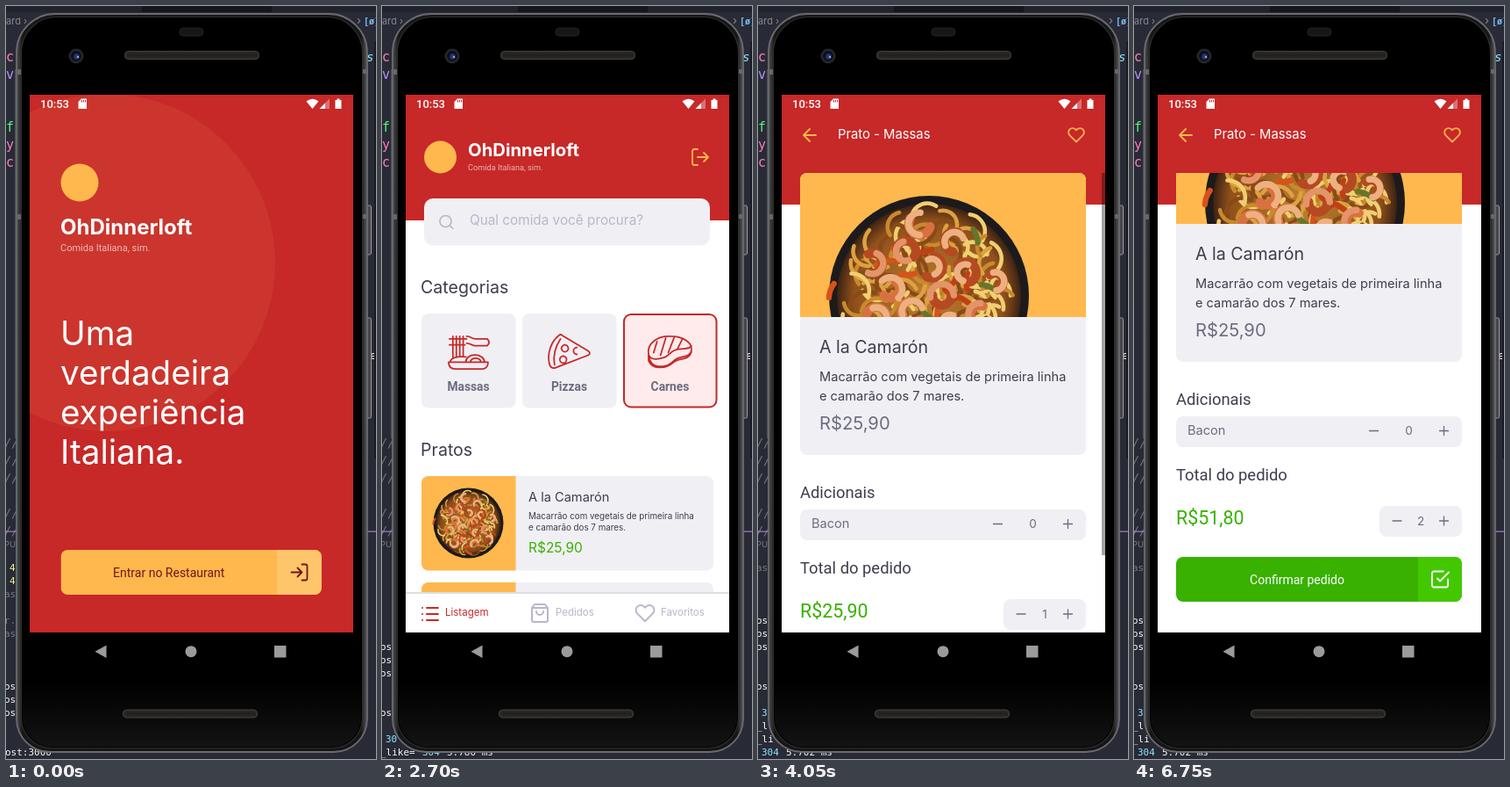
Recreate the animation shown at these times as an HTML page with a canvas. Size 422 by 857 pixels, loop 8000 ms.

```html
<!DOCTYPE html>
<html lang="pt-BR">
<head>
<meta charset="utf-8">
<title>Pedido no restaurante</title>
<style>
  html, body { margin: 0; width: 100%; height: 100%; overflow: hidden; background: #282a36; }
  canvas { display: block; }
</style>
</head>
<body>
<canvas id="stage" width="422" height="857"></canvas>
<script>
const ctx = document.getElementById('stage').getContext('2d');
const LOOP = 8000, STEP = 1350;
const BRAND = 'OhDinnerloft';
const RED = '#c72828', AMBER = '#ffb84d', PALE = '#f0eff4', INK = '#3d3d4d',
      GREY = '#6c6c80', MUTED = '#b7b7cc', GREEN = '#39b100', WHITE = '#fff';
const INTER = 'Inter, sans-serif', ROBOTO = 'Roboto, sans-serif', MONO = '"DejaVu Sans Mono", monospace';

const ICONS = {
  enter: 'M15 3h4a2 2 0 0 1 2 2v14a2 2 0 0 1-2 2h-4M10 17l5-5-5-5M15 12H3',
  leave: 'M9 21H5a2 2 0 0 1-2-2V5a2 2 0 0 1 2-2h4M16 17l5-5-5-5M21 12H9',
  search: 'M19 11a8 8 0 1 1-16 0a8 8 0 1 1 16 0M21 21l-4.35-4.35',
  list: 'M8 5h13M8 12h13M8 19h13M3 5h.1M3 12h.1M3 19h.1',
  bag: 'M6 2L3 6v14a2 2 0 0 0 2 2h14a2 2 0 0 0 2-2V6l-3-4zM3 6h18M16 10a4 4 0 0 1-8 0',
  heart: 'M20.84 4.61a5.5 5.5 0 0 0-7.78 0L12 5.67l-1.06-1.06a5.5 5.5 0 0 0-7.78 7.78L12 21.23l8.84-8.84a5.5 5.5 0 0 0 0-7.78z',
  back: 'M19 12H5M12 19l-7-7 7-7',
  check: 'M9 11l3 3L22 4M21 12v7a2 2 0 0 1-2 2H5a2 2 0 0 1-2-2V5a2 2 0 0 1 2-2h11',
  minus: 'M7 12h10',
  plus: 'M7 12h10M12 7v10',
  pasta: 'M8 4v24M12 4v24M16 4v24M20 4v24M4 7h20M4 14h18M24 4c5 0 6 3 10 3h14q4 4 0 8H34c-4 0-5-3-10-3M3 34h46c0 5-3 8-7 8H11c-5 0-8-3-8-8zM5 34c0-5 8-7 18-6M23 34c0-11 21-11 22 0M28 34c2-6 11-6 13 0',
  pizza: 'M15 3C6 10 1 24 4 36q1 5 6 5l39-15q4-2 0-5L19 3q-2-2-4 0zM17 7C11 16 8 26 10 37M22 14a4 4 0 1 0 .1 0M20 27a4 4 0 1 0 .1 0M36 17a4 4 0 1 0 .1 8',
  steak: 'M2 25C0 12 13 3 28 4c15 0 25 8 24 16c-1 10-14 6-20 12c-6 6-10 7-19 7C6 38 3 33 2 25zM2 25c2 7 10 6 17 4c8-2 8-9 18-10c8-1 13 0 15-4M2 26v6c4 11 20 10 28 3c7-7 19-2 22-13M12 10l-4 13M22 6l-6 20M32 5l-7 18M41 8l-5 10'
};

function text(str, x, y, size, color, font = INTER, style = '', align = 'left') {
  ctx.font = `${style} ${size}px ${font}`;
  ctx.fillStyle = color;
  ctx.textAlign = align;
  ctx.fillText(str, x, y);
}

function rect(x, y, w, h, color) {
  ctx.fillStyle = color;
  ctx.fillRect(x, y, w, h);
}

function box(x, y, w, h, r, fill, stroke, line = 1) {
  ctx.beginPath();
  ctx.roundRect(x, y, w, h, r);
  if (fill) { ctx.fillStyle = fill; ctx.fill(); }
  if (stroke) { ctx.strokeStyle = stroke; ctx.lineWidth = line; ctx.stroke(); }
}

function disc(x, y, r, color) {
  ctx.beginPath();
  ctx.arc(x, y, r, 0, Math.PI * 2);
  ctx.fillStyle = color;
  ctx.fill();
}

function shape(path, color) {
  ctx.fillStyle = color;
  ctx.fill(new Path2D(path));
}

function icon(name, x, y, color, scale = 1, line = 2) {
  ctx.save();
  ctx.translate(x, y);
  ctx.scale(scale, scale);
  ctx.strokeStyle = color;
  ctx.lineWidth = line;
  ctx.lineCap = ctx.lineJoin = 'round';
  ctx.stroke(new Path2D(ICONS[name]));
  ctx.restore();
}

function clipped(x, y, w, h, r, draw) {
  ctx.save();
  ctx.beginPath();
  ctx.roundRect(x, y, w, h, r);
  ctx.clip();
  draw();
  ctx.restore();
}

function seeded(seed) {
  return () => (seed = (seed * 16807) % 2147483647) / 2147483647;
}

// A bowl of noodles seen from above, with either prawns or strips on top.
function bowl(x, y, r, prawns) {
  const rand = seeded(prawns ? 9173421 : 3748113);
  const noodles = prawns ? ['#dca240', '#f0cf72', '#8a4a18', '#c88a2c'] : ['#c98522', '#dfa53c', '#7c4214', '#a9661c'];
  ctx.save();
  ctx.translate(x, y);
  ctx.scale(r, r);
  disc(0, 0, 1, '#1d1a1c');
  const glow = ctx.createRadialGradient(0, 0, 0.1, 0, 0, 0.92);
  glow.addColorStop(0, '#b87a2c');
  glow.addColorStop(0.8, '#8f501b');
  glow.addColorStop(1, '#3c2314');
  disc(0, 0, 0.92, glow);
  ctx.lineCap = 'round';

  // Arcs spread evenly over a disc of the given reach by the golden angle.
  const scatter = (count, reach, size, span, width, colors) => {
    for (let i = 0; i < count; i++) {
      const a = i * 2.4, d = reach * Math.sqrt((i + 0.5) / count), start = rand() * 6.28;
      ctx.beginPath();
      ctx.arc(Math.cos(a) * d, Math.sin(a) * d, size * (0.8 + rand() * 0.4), start, start + span);
      ctx.strokeStyle = colors[Math.floor(rand() * colors.length)];
      ctx.lineWidth = width;
      ctx.stroke();
    }
  };
  scatter(130, 0.78, 0.15, 2, 0.04, noodles);
  scatter(18, 0.76, 0.28, 0.6, 0.055, ['#c13f17', '#66762a', '#d8521c']);
  if (prawns) {
    scatter(17, 0.76, 0.1, 3.4, 0.09, ['#b54a22', '#d9703f']);
    scatter(17, 0.76, 0.1, 3.2, 0.065, ['#eeb080', '#e39468']);
  } else scatter(16, 0.68, 0.3, 0.6, 0.085, ['#e0a852', '#c65a20']);
  ctx.restore();
}

function logo(x, y, r, nameX, nameY, nameSize, tagY, tagSize) {
  disc(x, y, r, AMBER);
  text(BRAND, nameX, nameY, nameSize, WHITE, INTER, 'bold');
  text('Comida Italiana, sim.', nameX, tagY, tagSize, 'rgba(255,255,255,.65)', ROBOTO);
}

function button(x, y, w, split, fill, tail, label, color, glyph) {
  clipped(x, y, w, 51, 8, () => {
    rect(x, y, w, 51, fill);
    rect(split, y, x + w - split, 51, tail);
  });
  text(label, (x + split) / 2, y + 31, 14, color, ROBOTO, '', 'center');
  icon(glyph, (split + x + w) / 2 - 12, y + 13.5, color, 1, 1.8);
}

function welcome() {
  rect(27, 101, 369, 612, RED);
  disc(115, 292, 192, '#cb352d');
  logo(84, 201, 21.5, 62, 260, 24, 279, 11);
  ['Uma', 'verdadeira', 'experiência', 'Italiana.'].forEach((line, i) =>
    text(line, 62, 386 + i * 45, 38.6, WHITE));
  button(62.5, 619, 297.5, 309, AMBER, '#ffc56b', 'Entrar no Restaurant', '#6e1717', 'enter');
}

function listing(dish, meatChosen) {
  rect(27, 101, 369, 143, RED);
  logo(66.5, 172, 18.5, 98, 171, 20.3, 187, 9.2);
  icon('leave', 351, 160, AMBER, 1, 1.8);

  box(48, 219, 326, 53.5, 10, PALE);
  icon('search', 63.5, 236, MUTED, 0.82);
  text('Qual comida você procura?', 100, 249, 15.3, MUTED);

  text('Categorias', 44, 327, 19.6, INK);
  [['Massas', 'pasta', 73], ['Pizzas', 'pizza', 187], ['Carnes', 'steak', 302]].forEach(([label, glyph, x], i) => {
    const left = 45 + i * 115, active = meatChosen && i === 2;
    if (active) box(left + 1, 351, 105.5, 105.5, 8, '#ffebeb', RED, 2);
    else box(left, 350, 107.5, 107.5, 8, PALE);
    icon(glyph, x, 372, RED, 0.98, 1.8);
    text(label, left + 53.5, 438, 13.8, GREY, ROBOTO, 'bold', 'center');
  });

  text('Pratos', 44, 512, 19.6, INK);
  [535, 656].forEach(y => clipped(45, y, 333, 107.5, 8, () => {
    rect(45, y, 333, 108, PALE);
    rect(45, y, 107.5, 108, AMBER);
  }));
  bowl(98.5, 588.5, 40, dish.prawns);
  text(dish.name, 167, 564, 14.6, INK);
  dish.lines.forEach((line, i) => text(line, 167, 584 + i * 13, 9.8, INK));
  text(dish.price, 167, 622, 15.5, GREEN);

  rect(27, 667, 369, 2, '#dedee3');
  rect(27, 669, 369, 44, WHITE);
  icon('list', 43, 680, RED, 1, 1.9);
  text('Listagem', 72, 694, 11.5, RED);
  icon('bag', 168, 679, MUTED);
  text('Pedidos', 198, 694, 11.5, MUTED);
  icon('heart', 288, 679, MUTED);
  text('Favoritos', 318, 694, 11.5, MUTED);
}

function stepper(y, minusX, numberX, count) {
  icon('minus', minusX - 12, y - 12, GREY, 1, 1.3);
  text(count, numberX, y + 4.5, 13.5, GREY, INTER, '', 'center');
  icon('plus', 353.5 - 12, y - 12, GREY, 1, 1.3);
}

function detail(count, total, scroll, scrollbar) {
  rect(27, 101, 369, 125, RED);
  icon('back', 47, 135, AMBER, 1, 1.8);
  text('Prato - Massas', 91, 151, 14.8, WHITE);
  icon('heart', 352.8, 136.5, AMBER, 0.85, 2.1);

  clipped(27, 190, 369, 523, 0, () => {
    ctx.translate(0, -scroll);
    clipped(48, 190, 326, 321, 8, () => {
      rect(48, 190, 326, 321, PALE);
      clipped(48, 190, 326, 164, 0, () => {
        rect(48, 190, 326, 164, AMBER);
        bowl(195, 330, 114, true);
      });
    });
    text(camaron.name, 70, 395, 19.6, INK);
    camaron.lines.forEach((line, i) => text(line, 70, 427 + i * 22, 14.6, INK));
    text(camaron.price, 70, 482, 20.2, GREY);

    text('Adicionais', 48, 560, 18.4, INK, ROBOTO);
    box(48, 573, 326, 35, 8, PALE);
    text('Bacon', 61, 594, 14.6, GREY);
    stepper(589.5, 273.5, 313.5, '0');

    text('Total do pedido', 48, 646, 18.4, INK, ROBOTO);
    text(total, 48, 696, 21.4, GREEN, ROBOTO);
    box(280, 675, 94, 35, 8, PALE);
    stepper(692, 300, 327, count);
    button(48, 733, 326, 324, GREEN, '#43c800', 'Confirmar pedido', WHITE, 'check');
  });
  if (scrollbar) rect(392, 190, 4, 435, 'rgba(0,0,0,.36)');
}

const molho = {
  name: 'Ao molho', price: 'R$19,90', prawns: false,
  lines: ['Macarrão ao molho branco, fughi e cheiro', 'verde das montanhas.']
};
const camaron = {
  name: 'A la Camarón', price: 'R$25,90', prawns: true,
  lines: ['Macarrão com vegetais de primeira linha', 'e camarão dos 7 mares.']
};

const screens = [
  welcome,
  () => listing(molho, false),
  () => listing(camaron, true),
  () => detail('1', 'R$25,90', 0, true),
  () => detail('2', 'R$51,80', 0, false),
  () => detail('2', 'R$51,80', 106, false)
];

// Terminal rows peeking out beside the phone: [text, x, y, colour].
const LIGHT = '#f8f8f2', DIM = '#75777f', CYAN = '#8be9fd', YELLOW = '#f1fa8c', PINK = '#ff79c6';
const hosts = y => [0, 15, 30, 75].map(dy => ['os', -2, y + dy, LIGHT]);
const lastLogs = [['as', -2, 643, DIM], ...hosts(703), ['3', 4, 808, CYAN], ['_l', -2, 823, LIGHT],
  ['_li', -2, 838, LIGHT], ['304', 4, 853, CYAN], ['5.702 ms', 32, 853, LIGHT]];
const logs = [
  [['4', 4, 643, YELLOW], ['4', 4, 658, YELLOW], ['as', -2, 673, DIM], ['r.', -2, 703, DIM],
    ['as', -2, 718, DIM], ...hosts(778).slice(0, 3), ['ost:3000', -1, 853, LIGHT]],
  [['as', -2, 643, DIM], ['r.', -2, 673, DIM], ['as', -2, 688, DIM], ...hosts(748),
    ['304', 4, 853, CYAN], ['5.914 ms', 32, 853, LIGHT]],
  [...hosts(733), ['30', 4, 838, CYAN], ['_like=', -2, 853, LIGHT], ['304', 46, 853, CYAN], ['5.780 ms', 74, 853, LIGHT]],
  lastLogs, lastLogs, lastLogs
];

function editor(index) {
  rect(0, 0, 422, 857, '#282a36');
  rect(0, 0, 422, 7, '#21222c');
  rect(155, 0, 148, 7, '#15161d');
  text('ard ›', 0, 21, 11, '#85879a', INTER);
  text('›', 400, 21, 13, '#85879a', INTER);
  text('[ø]', 408, 21, 10, '#75bfff', MONO, 'bold');
  [['c', 63, PINK], ['v', 83, '#bd93f9'], ['f', 143, '#50fa7b'], ['y', 163, PINK], ['c', 183, PINK]]
    .forEach(([ch, y, color]) => text(ch, 0, y, 15, color, MONO));
  [502, 522, 542, 582, 602].forEach(y => text('//', -2, y, 14, '#70727c', MONO, 'italic'));
  text('se', 411, 63, 14, CYAN, MONO, 'italic');
  text('e', 415, 402, 13, LIGHT, MONO);
  rect(420, 40, 2, 475, '#191a21');
  rect(0, 597.5, 422, 1.2, '#a77fd8');
  text('PU', -2, 616, 9.5, DIM, INTER);
  logs[index].forEach(([str, x, y, color]) => text(str, x, y, 11, color, MONO));
}

function grille(x, y) {
  box(x, y, 153, 9, 4, '#292724', '#45423c');
  for (let i = 5; i < 150; i += 3) rect(x + i, y + 3, 1, 3, '#171615');
}

function phone() {
  [[227, 56], [355, 114]].forEach(([y, h]) => box(411, y, 5.5, h, 2, '#45454a', '#9a9a9c'));
  rect(10, 72, 2, 420, '#4a4b52');
  const rim = ctx.createLinearGradient(11, 0, 413, 0);
  [[0, '#55565a'], [0.012, '#303031'], [0.02, '#161616'], [0.98, '#161616'], [0.988, '#363637'], [1, '#606164']]
    .forEach(([at, color]) => rim.addColorStop(at, color));
  box(12, 9, 400, 840, [44, 44, 38, 38], rim, '#6a6b6e', 1.8);
  box(17.5, 12.5, 389, 832, [40, 40, 34, 34], '#000', '#2c2d2e', 1.2);
  [72, 237].forEach(y => {
    rect(11, y, 6, 6, '#66676a');
    rect(407, y, 6, 5, '#66676a');
  });

  const chin = ctx.createLinearGradient(0, 770, 0, 844);
  chin.addColorStop(0, 'rgba(35,35,35,0)');
  chin.addColorStop(1, 'rgba(35,35,35,.55)');
  box(19, 770, 386, 73, [0, 0, 33, 33], chin);

  box(198, 25, 27, 9, 4, '#171717', '#222');
  grille(135.5, 51.5);
  grille(133.5, 801);
  disc(80, 57, 8.5, '#252629');
  disc(80, 57, 6, '#0d1020');
  disc(80.5, 57.5, 3.2, '#27376d');
  disc(82, 58, 1.2, '#9aa9df');

  const nav = '#9b9b9b';
  shape('M101.5 734.8L114.5 727.5V742z', nav);
  disc(211, 734.7, 6.5, nav);
  rect(306, 728, 13.5, 13.5, nav);
}

function statusBar() {
  text('10:53', 39, 116, 13, WHITE, ROBOTO, '500');
  shape('M86 105.5h6v11.5h-9.5v-8z', WHITE);
  [86, 88, 90].forEach(x => rect(x, 107, 1, 2.5, RED));
  shape('M342.5 108.5Q349.5 103 356.5 108.5L349.5 117z', WHITE);
  shape('M369 105.5V117H357.5z', 'rgba(255,255,255,.35)');
  shape('M364 110.5V117H357.5z', WHITE);
  shape('M375.5 107h2v-1.5h3v1.5h2v10h-7z', WHITE);
}

function frame(now) {
  const index = Math.min(screens.length - 1, Math.floor((now % LOOP) / STEP));
  editor(index);
  phone();
  clipped(27, 101, 369, 612, 0, () => {
    rect(27, 101, 369, 612, WHITE);
    screens[index]();
    statusBar();
  });
  requestAnimationFrame(frame);
}
requestAnimationFrame(frame);
</script>
</body>
</html>
```
